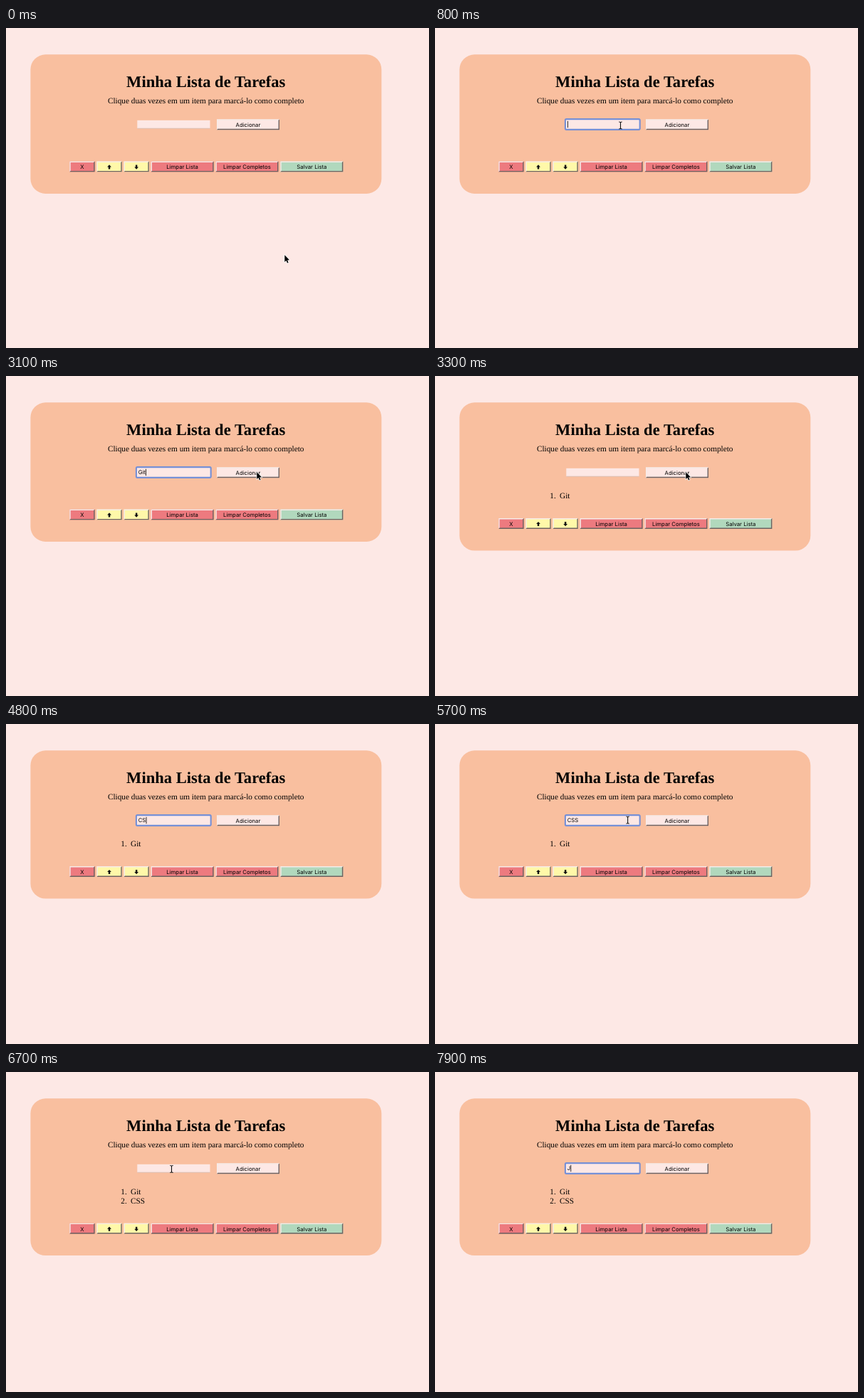
An HTML page with a canvas for the animation above (8000 ms loop, 594 by 450 pixels).

```html
<!DOCTYPE html>
<html lang="pt-BR">
<head>
<meta charset="utf-8">
<title>Minha Lista de Tarefas</title>
<style>
  html, body { margin: 0; width: 100%; height: 100%; overflow: hidden; background: #fde8e5; }
  canvas { display: block; width: 594px; height: 450px; }
</style>
</head>
<body>
<canvas id="stage"></canvas>
<script>
const W = 594, H = 450, LOOP = 8000, STEP = 100;
const PINK = '#fde8e5', PEACH = '#f9bf9f', RED = '#ed7a7f', YELLOW = '#fff8a9', GREEN = '#b1d8bd';
const SERIF = '"Liberation Serif", serif', SANS = 'Inter, sans-serif';
const LINE = 12.6, BTN_H = 14.8;

const canvas = document.getElementById('stage');
const ratio = window.devicePixelRatio || 1;
canvas.width = W * ratio;
canvas.height = H * ratio;
const ctx = canvas.getContext('2d');
ctx.scale(ratio, ratio);
ctx.textRendering = 'geometricPrecision';

// Pointer stops: time, x, y
const path = [
  [0, 391, 319], [500, 246, 137], [700, 246, 137], [900, 275, 137],
  [2400, 275, 137], [3100, 352, 135], [3300, 352, 135],
  [3700, 225, 137], [5400, 225, 137], [6100, 341, 132],
  [6300, 341, 132], [6700, 232.5, 136.5], [LOOP, 232.5, 136.5]
];
const hidden = [[1400, 2500], [4500, 5500], [7900, LOOP]];
const presses = [[3200, 3300], [6200, 6300]];
const focused = [[600, 3200], [3700, 6200], [6800, LOOP]];
const typed = [
  [0, ''], [1400, 'G'], [1700, 'Gi'], [2000, 'Git'], [3300, ''],
  [4500, 'C'], [4800, 'CS'], [5000, 'CSS'], [6300, ''], [7900, 'J']
];
const added = [[3300, 'Git'], [6300, 'CSS']];
const buttons = [
  [89.3, 35.3, RED, 'X'], [127.4, 35.3, YELLOW, 'up'], [165.5, 35.3, YELLOW, 'down'],
  [203.6, 88, RED, 'Limpar Lista'], [294.4, 88, RED, 'Limpar Completos'],
  [385.3, 88, GREEN, 'Salvar Lista']
];

const within = (spans, t) => spans.find(([a, b]) => t >= a && t < b);
const latest = (list, t) => list.filter(e => e[0] <= t).pop();

function pointerAt(t) {
  const i = path.findIndex(p => p[0] > t);
  const [t0, x0, y0] = path[i - 1], [t1, x1, y1] = path[i];
  const p = (t - t0) / (t1 - t0), k = p * p * (3 - 2 * p);
  return [x0 + (x1 - x0) * k, y0 + (y1 - y0) * k];
}

function text(str, x, y, font, align = 'left') {
  ctx.font = font;
  ctx.textAlign = align;
  ctx.fillStyle = '#000';
  ctx.fillText(str, x, y);
}

function poly(points) {
  ctx.beginPath();
  points.forEach(([x, y]) => ctx.lineTo(x, y));
  ctx.closePath();
}

function fillPoly(color, points) {
  ctx.fillStyle = color;
  poly(points);
  ctx.fill();
}

function blockArrow(cx, cy, dir) {
  const shape = [[0, -3.2], [2.9, 0], [1.2, 0], [1.2, 3], [-1.2, 3], [-1.2, 0], [-2.9, 0]];
  fillPoly('#111', shape.map(([x, y]) => [cx + x, cy + y * dir]));
}

function button(x, y, w, color, label, pressed) {
  const b = 1.4, r = x + w, e = y + BTN_H;
  const light = '#f6ece8', dark = '#6d6260';
  ctx.fillStyle = color;
  ctx.fillRect(x, y, w, BTN_H);
  fillPoly(pressed ? dark : light,
    [[x, y], [r, y], [r - b, y + b], [x + b, y + b], [x + b, e - b], [x, e]]);
  fillPoly(pressed ? light : dark,
    [[r, e], [x, e], [x + b, e - b], [r - b, e - b], [r - b, y + b], [r, y]]);
  const cx = x + w / 2;
  if (label === 'up') blockArrow(cx, y + 8, 1);
  else if (label === 'down') blockArrow(cx, y + 8, -1);
  else text(label, cx, y + 10.9, '7.75px ' + SANS, 'center');
}

function field(t) {
  const span = within(focused, t);
  const [typedAt, value] = latest(typed, t);
  ctx.fillStyle = PINK;
  ctx.fillRect(184.3, 129.8, 102.2, 11.6);
  if (span) {
    ctx.fillRect(183, 128.5, 104.6, 14);
    ctx.strokeStyle = '#7690d6';
    ctx.lineWidth = 2.1;
    ctx.beginPath();
    ctx.roundRect(182.9, 128.1, 104.8, 14.8, 1.6);
    ctx.stroke();
  } else {
    ctx.fillStyle = '#cdb0a3';
    ctx.fillRect(184.3, 140.8, 102.2, 0.7);
  }
  text(value, 185.7, 138.4, '7.75px ' + SANS);
  if (!span) return;
  const since = t - Math.max(span[0], typedAt);
  if (since % 1000 < 500) {
    ctx.fillStyle = '#000';
    ctx.fillRect(186 + ctx.measureText(value).width, 130.8, 0.8, 9.4);
  }
}

function pointer(t) {
  if (within(hidden, t)) return;
  const [x, y] = pointerAt(t);
  ctx.save();
  ctx.translate(x, y);
  if (x > 184 && x < 287 && y > 129 && y < 142) {
    ctx.beginPath();
    ctx.moveTo(-2.2, -5); ctx.quadraticCurveTo(0, -5, 0, -3.6);
    ctx.lineTo(0, 3.6); ctx.quadraticCurveTo(0, 5, -2.2, 5);
    ctx.moveTo(2.2, -5); ctx.quadraticCurveTo(0, -5, 0, -3.6);
    ctx.moveTo(0, 3.6); ctx.quadraticCurveTo(0, 5, 2.2, 5);
    ctx.strokeStyle = '#111';
    ctx.lineWidth = 1.1;
    ctx.stroke();
  } else {
    poly([[0.3, 0.3], [0.3, 10], [2.5, 8], [4, 11.6], [5.6, 10.9], [4.1, 7.4], [7, 7.2]]);
    ctx.strokeStyle = '#fff';
    ctx.lineWidth = 1.3;
    ctx.stroke();
    ctx.fillStyle = '#000';
    ctx.fill();
  }
  ctx.restore();
}

function draw(t) {
  const items = added.filter(([at]) => at <= t);
  const grow = items.length * LINE;
  ctx.fillStyle = PINK;
  ctx.fillRect(0, 0, W, H);
  ctx.fillStyle = PEACH;
  ctx.beginPath();
  ctx.roundRect(34.4, 37.3, 492.9, 195.6 + grow, 21);
  ctx.fill();

  text('Minha Lista de Tarefas', 280.7, 83, 'bold 22.55px ' + SERIF, 'center');
  text('Clique duas vezes em um item para marcá-lo como completo',
    280.7, 105.6, '11.28px ' + SERIF, 'center');
  field(t);
  button(296, 128.4, 88, PINK, 'Adicionar', within(presses, t));
  items.forEach(([, name], i) => {
    const y = 172.4 + i * LINE;
    text(i + 1 + '.', 169.8, y, '11.28px ' + SERIF, 'right');
    text(name, 175, y, '11.28px ' + SERIF);
  });
  buttons.forEach(([x, w, color, label]) => button(x, 187.5 + grow, w, color, label));
  pointer(t);
}

const start = performance.now();
function frame() {
  const t = (performance.now() - start) % LOOP;
  draw(Math.floor(t / STEP) * STEP);
  requestAnimationFrame(frame);
}
frame();
</script>
</body>
</html>
```
